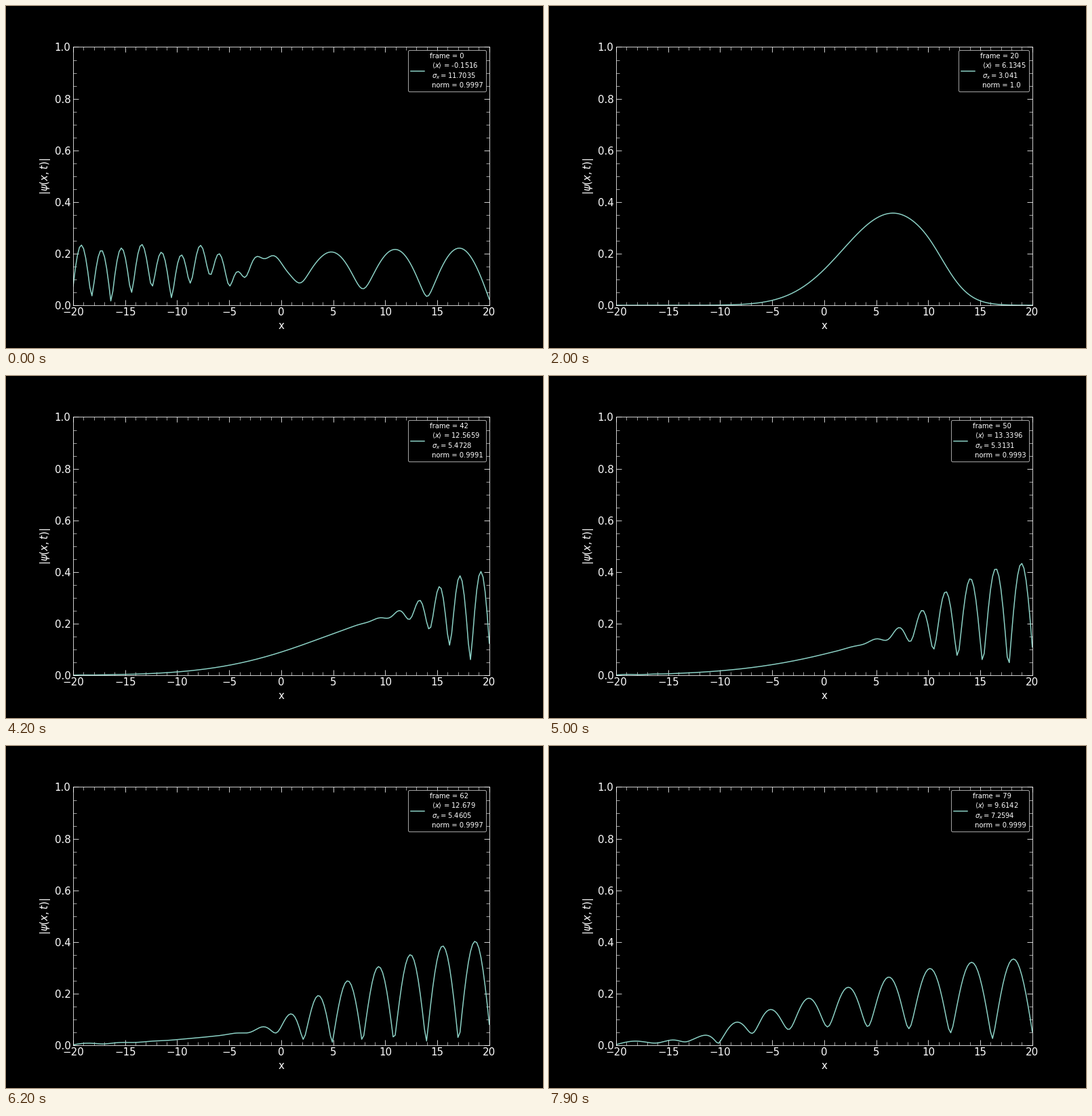
Write a matplotlib script that moves like this. It is 792 px wide and 504 px high and loops after 8 s.

```python
import numpy as np
import matplotlib.pyplot as plt
from matplotlib.animation import FuncAnimation
from matplotlib.ticker import AutoMinorLocator

plt.style.use("dark_background")
plt.rcParams.update({"font.family": "DejaVu Sans", "font.size": 15})

FRAMES = 80
N = 200
STATES = 120
x = np.linspace(-20, 20, N)
dx = x[1] - x[0]
dt = 40 / (STATES - 1)


def simpson_odd(f):
    return dx / 3 * (f[0] + f[-1] + 4 * f[1:-1:2].sum() + 2 * f[2:-1:2].sum())


def integrate(f):
    """Simpson's rule for an even number of points, averaged over both ends."""
    left = simpson_odd(f[:-1]) + dx * (f[-2] + f[-1]) / 2
    right = simpson_odd(f[1:]) + dx * (f[0] + f[1]) / 2
    return (left + right) / 2


def evolve():
    """Crank-Nicolson steps of a free wave packet between hard walls."""
    eye = np.eye(N)
    lap = (np.eye(N, k=1) + np.eye(N, k=-1) - 2 * eye) / dx**2
    ham = -0.5 * lap
    step = np.linalg.solve(eye + 0.5j * dt * ham, eye - 0.5j * dt * ham)
    psi = (2 * np.pi) ** -0.25 * np.exp(-x**2 / 4 + 1j * x)
    out = [psi]
    for _ in range(STATES - 1):
        out.append(step @ out[-1])
    return np.abs(out)


def caption(i, amp):
    rho = amp**2
    norm = integrate(rho)
    mean = integrate(x * rho)
    sigma = np.sqrt(integrate(x**2 * rho) - mean**2)
    mean, sigma, norm = (round(float(v), 4) for v in (mean, sigma, norm))
    return (f"frame = {i}\n $\\langle x \\rangle$ = {mean}\n"
            f" $\\sigma_x = {sigma}$\n norm = {norm}")


amps = evolve()

fig, ax = plt.subplots(figsize=(11, 7), dpi=72)
fig.subplots_adjust(left=0.125, right=0.9, bottom=0.125, top=0.88)
ax.set(xlim=(-20, 20), ylim=(0, 1), xlabel="x", ylabel=r"$|\psi(x,t)|$")
ax.xaxis.set_minor_locator(AutoMinorLocator())
ax.yaxis.set_minor_locator(AutoMinorLocator())
ax.tick_params(which="both", direction="in", top=True, right=True)
ax.tick_params(which="major", length=8)
ax.tick_params(which="minor", length=5)

line, = ax.plot(x, amps[-1], lw=1.5, label=caption(0, amps[-1]))
label = ax.legend(loc="upper right", fontsize=10).get_texts()[0]


def draw(i):
    # index -1 wraps, so the loop opens on the last state
    amp = amps[i - 1]
    line.set_ydata(amp)
    label.set_text(caption(i, amp))
    return line, label


anim = FuncAnimation(fig, draw, frames=FRAMES, interval=100,
                     repeat=True, repeat_delay=0)
plt.show()
```
